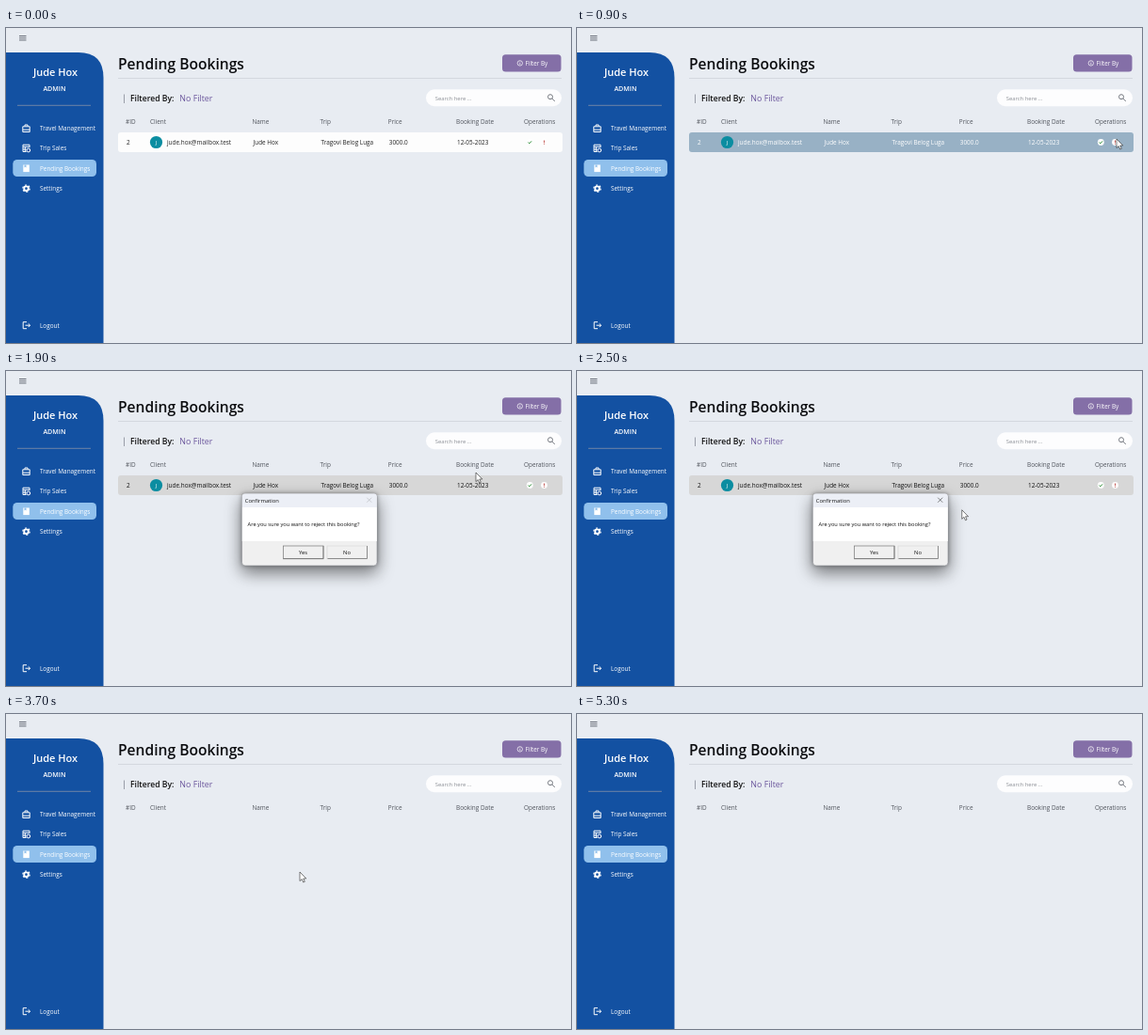
These frames come from a looping animation (600 by 335 pixels, 5.9 s). An HTML page:

```html
<!DOCTYPE html>
<html lang="en">
<head>
<meta charset="utf-8">
<title>Pending Bookings</title>
<style>
  html, body { margin: 0; width: 100%; height: 100%; overflow: hidden; background: #e8ecf2; }
  svg { display: block; width: 600px; height: 335px; font: 6.4px "Open Sans", "Noto Sans", sans-serif; }
  .semi { font-weight: 600; }
  .mid { text-anchor: middle; }
  #row { --fill: #fdfdfd; --ink: #222; }
  #row.hover { --fill: #98b1c5; --ink: #fff; }
  #row.picked { --fill: #d7d7d7; --ink: #111; }
  #row > rect { fill: var(--fill); }
  #cells { fill: var(--ink); }
  #dialog { transform-origin: 322px 168.5px; }
  #panel { filter: drop-shadow(0 7px 9px #0006) drop-shadow(0 0 2px #0006); }
</style>
</head>
<body>
<svg viewBox="0 0 600 335">
  <!-- Sidebar -->
  <path d="M0 26H77Q103.500 26 103.500 53V335H0Z" fill="#1351a2"/>
  <path d="M14 8.500h7.500M14 10.700h7.500M14 12.900h7.500" stroke="#555b66" stroke-width=".9"/>
  <g fill="#fff">
    <text class="semi mid" x="52.500" y="51" font-size="11">Jude Hox</text>
    <text class="semi mid" x="51.500" y="67.300" font-size="7.100">ADMIN</text>
    <path d="M12 82.300H90" stroke="#8492a8" stroke-width=".8"/>
    <rect x="7.300" y="140" width="88.700" height="18" rx="4.500" fill="#90c0ec"/>
    <g id="menu"></g>
  </g>
  <g fill="none" stroke="#fff" stroke-width="1">
    <path d="M17.800 104.800h7.400v5.700h-7.400zM20 104.500v-1.500h3v1.500M18 108.200h7"/>
    <path d="M25 127v-2.800h-7v7.300h3.500M18 126.300h7M20.300 126.500v5M18 129h3.500"/>
    <circle cx="23.800" cy="130" r="1.900"/>
    <path d="M22 312.700h-3.800v7H22M20.500 316.200h5M23.700 314.300l1.900 1.900-1.900 1.900"/>
    <circle cx="21.500" cy="170.700" r="2.300" stroke-width="1.900"/>
    <circle cx="21.500" cy="170.700" r="3.700" stroke-width="1.200" stroke-dasharray="1.937 1.937"/>
  </g>
  <path d="M18.300 145.500h6.500v7.600h-6.500z" fill="#fff"/>
  <path d="M19.500 145.500h2v3l-1-.7-1 .7z" fill="#90c0ec"/>

  <!-- Heading and search -->
  <text class="semi" x="119" y="43.800" font-size="15.600" fill="#0c0d10">Pending Bookings</text>
  <path d="M119 53.500H590" stroke="#d2d6dd" stroke-width=".9"/>
  <rect x="527" y="28.300" width="62.500" height="18.200" rx="3.500" fill="#846fa7"/>
  <circle cx="545.800" cy="37.400" r="2.700" fill="none" stroke="#fff" stroke-width=".7"/>
  <path d="M545.800 35.700v.7M545.800 37v2" stroke="#fff" stroke-width=".7"/>
  <text x="551.600" y="39.700" fill="#fff" font-size="6.300">Filter By</text>
  <path d="M125.500 70.500V80" stroke="#9a9ea8"/>
  <text class="semi" x="132" y="78" font-size="8.600" fill="#111">Filtered By:</text>
  <text x="184.300" y="78" font-size="8.900" font-weight="500" fill="#6b569c">No Filter</text>
  <rect x="446" y="65.300" width="144" height="17.900" rx="8.950" fill="#fdfdfe"/>
  <text x="455.700" y="76.800" font-size="5.900" fill="#8d9097">Search here ...</text>
  <g fill="none" stroke="#777b82" stroke-width="1">
    <circle cx="578" cy="73.200" r="2.500"/><path d="M579.800 75l3 3"/>
  </g>

  <!-- Table -->
  <g id="heads" fill="#50545c"></g>
  <g id="row">
    <rect x="119" y="111" width="472" height="21" rx="3"/>
    <circle cx="159.500" cy="121.500" r="6.600" fill="#0b8da1"/>
    <text class="mid" x="159.500" y="123.700" font-size="6" fill="#fff">J</text>
    <g id="cells"></g>
    <rect x="550" y="115.200" width="12.600" height="12.600" rx="3" fill="#0a7a16"/>
    <rect id="reject" x="565.200" y="115.200" width="12.600" height="12.600" rx="3"/>
    <g fill="#fff"><circle cx="556.300" cy="121.500" r="3.400"/><circle cx="571.500" cy="121.500" r="3.400"/></g>
    <path d="M554.600 121.600l1.200 1.200 2.200-2.400" fill="none" stroke="#0a7a16" stroke-width=".9"/>
    <path d="M571.500 119.500v2.400M571.500 122.700v1" stroke="#bb4340" stroke-width=".9"/>
  </g>

  <!-- Confirmation dialog -->
  <g id="dialog" fill="#111">
    <rect id="panel" x="250.500" y="130.300" width="143.500" height="76.700" rx="3.500" fill="#f0f0f0" stroke="#8b8e94" stroke-width=".6"/>
    <path d="M250.800 145v-11.500q0-3 3-3h137q3 0 3 3V145z" fill="#eceff6"/>
    <path d="M250.800 145h143v36h-143z" fill="#fff"/>
    <text x="253.800" y="139.700" font-size="5.850">Confirmation</text>
    <path id="close" d="M383.200 134.700l5 5M388.200 134.700l-5 5" stroke-width=".6"/>
    <text x="256.600" y="165" font-size="5.700">Are you sure you want to reject this booking?</text>
    <g id="choices"></g>
  </g>

  <!-- Pointers -->
  <path id="arrow" d="M0 0V9.600L2.200 7.600 3.700 11 5.300 10.300 3.800 7H6.800Z" fill="#fff" stroke="#222" stroke-width=".6" stroke-linejoin="round"/>
  <g id="busy" fill="none">
    <circle cx="571.800" cy="118.500" r="4.800" fill="#dcecf8" stroke="#2f7fc4" stroke-width="2.200"/>
    <path d="M568.500 120.200h6.600" stroke="#fff" stroke-width="1.600"/>
  </g>
</svg>
<script>
const LOOP = 5900, STEP = 100;
const $ = id => document.getElementById(id);
const label = (x, y, s) => `<text x="${x}" y="${y}">${s}</text>`;
const columns = [127, 153, 261.5, 333.5, 405.800, 478, 550];

$('menu').innerHTML =
  ['Travel Management', 'Trip Sales', 'Pending Bookings', 'Settings']
    .map((s, i) => label(36, 109 + i * 21.4, s)).join('') + label(36, 318.600, 'Logout');

$('heads').innerHTML =
  ['#ID', 'Client', 'Name', 'Trip', 'Price', 'Booking Date', 'Operations']
    .map((s, i) => label(columns[i], 102, s)).join('');

$('cells').innerHTML =
  ['2', 'jude.hox@mailbox.test', 'Jude Hox', 'Tragovi Belog Luga', '3000.0', '12-05-2023']
    .map((s, i) => label(i === 1 ? 171 : columns[i] + 1, 124, s)).join('');

$('choices').innerHTML = ['Yes', 'No'].map((s, i) => {
  const x = 294.5 + i * 46.5;
  return `<rect x="${x}" y="186" width="42.500" height="13.800" fill="#f0f0f0" stroke="${i ? '#d8d8d8' : '#777'}" stroke-width=".7"/>
    <path d="M${x + .5} 199.500h42v-13.500" fill="none" stroke="#777" stroke-width=".8"/>
    <text class="mid" x="${x + 21}" y="195.200" font-size="5.800">${s}</text>`;
}).join('');

// Pointer stops: time, x, y
const route = [
  [500, 584, 230], [900, 573, 118], [1600, 573, 118], [1900, 499, 108], [2200, 499, 108],
  [2800, 318.5, 187.5], [3400, 318.5, 187.5], [3500, 318.5, 191], [3600, 318.5, 191],
  [3700, 312, 168], [4300, 290, 40]
];

function pointerAt(t) {
  const i = Math.max(1, route.findIndex(p => p[0] >= t));
  const [a, x, y] = route[i - 1], [b, u, v] = route[i];
  const k = (t - a) / (b - a), ease = k * k * (3 - 2 * k);
  return [x + (u - x) * ease, y + (v - y) * ease];
}

const show = (id, on) => $(id).style.display = on ? '' : 'none';
const between = (t, a, b) => t >= a && t < b;

function draw(t) {
  const moving = between(t, 500, 4300), busy = between(t, 1500, 1700);
  show('arrow', moving && !busy);
  show('busy', busy);
  if (moving) $('arrow').setAttribute('transform', `translate(${pointerAt(t)})`);

  show('row', t < 3100);
  $('row').setAttribute('class', t < 800 ? '' : t < 1700 ? 'hover' : 'picked');
  $('reject').setAttribute('fill', between(t, 900, 1700) ? '#cb4d4a' : '#bb4340');

  show('dialog', between(t, 1700, 3100));
  const [opacity, scale] = t < 1800 ? [.4, .95] : t < 3000 ? [1, 1] : [.75, .978];
  $('dialog').style.opacity = opacity;
  $('dialog').style.transform = `scale(${scale})`;
  $('close').setAttribute('stroke', t < 2300 ? '#b5b7bc' : '#333');
}

function tick() {
  draw(Math.floor(performance.now() % LOOP / STEP) * STEP);
  requestAnimationFrame(tick);
}
tick();
</script>
</body>
</html>
```
